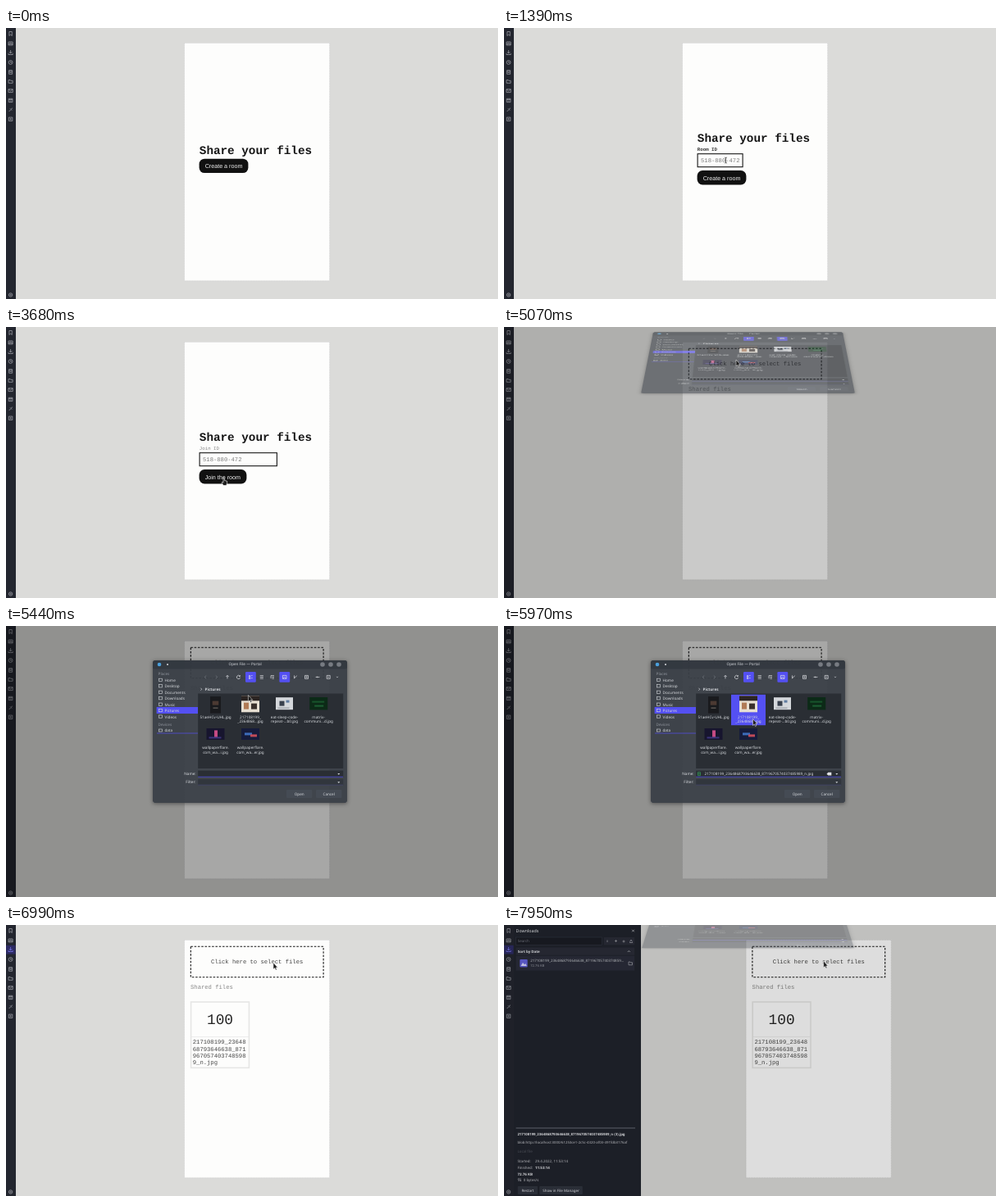
Recreate the animation shown at these times as an HTML page. Size 600 by 331 pixels, loop 8000 ms.

```html
<!DOCTYPE html>
<html lang="en">
<head>
<meta charset="utf-8">
<title>Share your files</title>
<style>
  html, body { margin: 0; width: 100%; height: 100%; overflow: hidden; background: #dbdbd9; }
  #stage { position: relative; width: 600px; height: 331px; overflow: hidden; }
  #stage > * { position: absolute; left: 0; top: 0; width: 600px; height: 331px; }
  #dim { background: #000; }
  #scene { perspective: 1286px; perspective-origin: 297.5px 165px; overflow: hidden; }
  #dialog { position: absolute; left: 179px; top: 42px; width: 237px; height: 174px;
    transform-origin: 50% 0; border-radius: 2px; box-shadow: 0 1px 5px rgba(0,0,0,.45); }
  text { white-space: pre; text-rendering: geometricPrecision; }
  .mono { font-family: "Liberation Mono", "Courier New", monospace; }
  .sans { font-family: "Liberation Sans", Arial, sans-serif; }
  .ui { font-family: "Noto Sans", sans-serif; }
  .line { fill: none; stroke-width: .7; }
</style>
</head>
<body>
<div id="stage">
  <svg id="base" viewBox="0 0 600 331"></svg>
  <div id="dim"></div>
  <div id="scene"><svg id="dialog" viewBox="179 42 237 174"></svg></div>
  <svg id="top" viewBox="0 0 600 331"></svg>
</div>
<script>
const LOOP = 8000;
const $ = id => document.getElementById(id);

const text = (cls, x, y, size, str, fill, extra = '') =>
  `<text class="${cls}" x="${x}" y="${y}" font-size="${size}" fill="${fill}" ${extra}>${str}</text>`;
const rect = (x, y, w, h, fill, extra = '') =>
  `<rect x="${x}" y="${y}" width="${w}" height="${h}" fill="${fill}" ${extra}/>`;
const dot = (x, y, r, fill) => `<circle cx="${x}" cy="${y}" r="${r}" fill="${fill}"/>`;
const line = (d, color, extra = '') => `<path class="line" d="${d}" stroke="${color}" ${extra}/>`;
const at = (x, y, body) => `<g transform="translate(${x} ${y})">${body}</g>`;
const group = (id, body) => `<g id="${id}">${body}</g>`;
const MID = 'text-anchor="middle"';
const BOLD = 'font-weight="700"';
const INK = '#161616', GREY = '#858585';
const ID = '217108199_2364868793646638_8719670574037485989';

// Web page
const heading = y => text('mono', 235.8, y, 14.3, 'Share your files', INK, BOLD);
const button = (y, w, label) => rect(235.6, y, w, 17.4, '#111', 'rx="6.5"') +
  text('sans', 242.7, y + 11.5, 7.15, label, '#f4f4f4');
const field = w => rect(236.1, 153.7, w, 16, '#fdfdfc', `stroke="${INK}" stroke-width="1.1"`) +
  text('mono', 240, 164.2, 7.2, '518-880-472', '#7b7b7b');
const nameLines = ['217108199_23648', '68793646638_871', '967057403748598', '9_n.jpg'];

const home = heading(153.6) + button(159.7, 59.8, 'Create a room');
const room = heading(139.2) + text('mono', 235.8, 150.2, 5.75, 'Room ID', '#333', BOLD) +
  field(55) + button(174, 59.8, 'Create a room');
const join = heading(139.2) + text('mono', 235.8, 150.2, 5.75, 'Join ID', GREY) +
  field(94.3) + button(174, 57.8, 'Join the room');
const card = rect(225.6, 94, 70.8, 80.4, '#fdfdfc', 'stroke="#e6e6e5" stroke-width="1.6"') +
  line('M226 136.6H296', '#e6e6e5') +
  '<text id="percent" class="mono" x="261" y="120.8" font-size="17.8" fill="#222" text-anchor="middle"></text>' +
  nameLines.map((s, i) => text('mono', 227.8, 145.2 + i * 8.33, 7.2, s, '#444')).join('');
const share = rect(225.3, 26.3, 161.8, 37.4, 'none',
    `stroke="${INK}" stroke-width="1.1" stroke-dasharray="2.6 1.7"`) +
  text('mono', 306.2, 47, 7.2, 'Click here to select files', '#444', MID) +
  text('mono', 225, 77.6, 7.2, 'Shared files', GREY) + group('card', card);

// Browser side bar
const glyphs = [
  [7, 'M-1.7-2.5H1.7V2.5L0 1L-1.7 2.5Z'],
  [19, 'M-2.5-2H2.5V2H-2.5ZM-2.5 .5H2.5M-1-1H1'],
  [30, 'M0-3V1M-1.8-.8L0 1L1.8-.8M-2.6 1V2.5H2.6V1'],
  [42, 'M-2.4 0A2.4 2.4 0 1 1 2.4 0A2.4 2.4 0 1 1-2.4 0M0-1.4V.2H1.3'],
  [54, 'M-2-2.3H2V2.3H-2ZM-2-1H2M-1 .5H1'],
  [65.3, 'M-2.5-1.8H-.4L0-1H2.5V2H-2.5Z'],
  [76.7, 'M-2.6-1.9H2.6V1.9H-2.6ZM-2.6-1.9L0 .3L2.6-1.9'],
  [88.3, 'M-2.3-2H2.3V2.3H-2.3ZM-2.3-.8H2.3M-1 .8H1'],
  [100, 'M-2 2L0 0M-.6-1.6L1.6 .6M.4-.6L2.3-2.2'],
  [111.3, 'M-2.2-2.2H2.2V2.2H-2.2ZM-1.1 0H1.1M0-1.1V1.1'],
  [326, 'M-2.2 0A2.2 2.2 0 1 1 2.2 0A2.2 2.2 0 1 1-2.2 0M-.7 0A.7 .7 0 1 1 .7 0A.7 .7 0 1 1-.7 0'],
];
const sidebar = rect(0, 0, 12, 331, '#23262f') +
  glyphs.map(([y, d]) => at(5.6, y, line(d, '#a9abb2'))).join('') +
  group('active', rect(0, 24.8, 11.6, 10.8, '#2d2b63') + at(5.6, 30, line(glyphs[2][1], '#8280ff')));

// Downloads panel
const pale = '#c9cbd0', white = '#eceef2', faint = '#565a64';
const ui = (x, y, str, fill = pale, size = 4.45, extra = '') => text('ui', x, y, size, str, fill, extra);
const panel = rect(12, 0, 155, 331, '#20232c') +
  ui(14.6, 8.8, 'Downloads', white, 5.3) + line('M156.2 5.7L158.8 8.3M158.8 5.7L156.2 8.3', pale) +
  rect(14.6, 15, 105, 9.4, '#1a1c24', 'stroke="#343845" stroke-width=".6"') + ui(16.8, 21.2, 'Search', '#777b85') +
  rect(121.8, 15, 37.4, 9.4, '#2a2d38') +
  line('M126 18.5V21M135 19L136.5 20.5L138 19M136.5 18V20.5M144.5 20H147.5M146 18.5V21.5M153 21.5H157M153.5 20.5L155 18L156.5 20.5', '#a9abb2') +
  rect(14.6, 27.5, 144.6, 9.2, '#2a2d38') + ui(16.8, 33.7, 'Sort by Date', white, 4.4, BOLD) +
  line('M150.8 33L152.3 31.5L153.8 33', pale) +
  rect(14.6, 37.6, 144.6, 18, '#2a2d3a') +
  rect(19.3, 42, 9.4, 9.4, '#6462dc', 'rx="1"') + '<path d="M20.5 50L23 46L25 48.5L26.2 47L27.8 50Z" fill="#dcdcff"/>' +
  ui(32.2, 45.4, ID.slice(0, 44) + '...') + ui(32.2, 51.2, '72.76 KB', '#999ca5', 4.2) +
  line('M152 45H153.7L154.2 45.8H156.5V48.8H152Z', '#a9abb2') +
  line('M14.6 248H160', '#8b8e98') +
  ui(16.4, 256.7, ID + '_n (3).jpg', white, 4.32, BOLD) +
  ui(16.4, 266.8, 'blob:http://localhost:3000/61253ce1-2c5c-4320-af03-491fdb3176af', pale, 4.3) +
  ui(16.4, 277.7, 'Local file', faint) +
  ui(16.4, 289.5, 'Started:') + ui(38, 289.5, '29.4.2022, 11:53:14') +
  ui(16.4, 297.5, 'Finished:') + ui(38, 297.5, '11:53:14', white, 4.45, BOLD) +
  ui(16.4, 305.8, '72.76 KB', white, 4.45, BOLD) +
  line('M18 313V309.5L17 310.5M20 309.5V313L21 312', pale) + ui(23.7, 313, '0 bytes/s') +
  rect(16.7, 319, 24.4, 10, '#30343f', 'rx="1"') + ui(28.9, 325.7, 'Restart', white, 4.45, MID) +
  rect(43.2, 319, 52.6, 10, '#30343f', 'rx="1"') + ui(69.5, 325.7, 'Show in File Manager', white, 4.45, MID);

$('base').innerHTML = rect(0, 0, 600, 331, '#dbdbd9') +
  group('page', rect(217.5, 18.3, 177.2, 290.5, '#fdfdfc', 'stroke="#cbcbc9" stroke-width=".8" stroke-dasharray="1 1"') +
    group('home', home) + group('room', room) + group('join', join) + group('share', share)) +
  group('panel', panel) + sidebar;

// File dialog
const VIOLET = '#5450f2', LABEL = '#d6d9dd';
const label = (x, y, str, fill = LABEL, extra = '') => text('ui', x, y, 4.65, str, fill, extra);
const places = ['Home', 'Desktop', 'Documents', 'Downloads', 'Music', 'Pictures', 'Videos'];
const tools = [
  [243, 'M1.2-1.8L-.8 0L1.2 1.8', 1], [257, 'M-1.2-1.8L.8 0L-1.2 1.8', 1],
  [270, 'M0 2V-2M-1.6-.4L0-2L1.6-.4'], [283.4, 'M1.7-1.2A2.1 2.1 0 1 0 2.1 .6M2-2.3V-.9H.6'],
  [298.4, 'M-2-1.8H-.5V-.3H-2ZM.7-1.8H2.2M.7 1.2H2.2M-2 .6H-.5V2H-2Z'],
  [311.7, 'M-2-1.8H2.2M-2 0H2.2M-2 1.8H2.2'], [325, 'M-2-1.8H2M-.6 0H2M-.6 1.8H2M-2-1.8V1.8'],
  [339.7, 'M-2.3-2H2.3V2H-2.3ZM-1.8 1.6L0-.4L1.8 1.6'], [353, 'M-1.5-2V1.5M-1.5 1.8L1.5-1.8'],
  [366.5, 'M-2-2H2V2H-2ZM-1 0H1M0-1V1'], [380, 'M-2.4 0H2.4M-.6-.8V.8'],
  [393.2, 'M-2-2H2V2H-2ZM-.9 0H.9'], [404, 'M-.8-.6L0 .4L.8-.6'],
];
const thumbs = [
  [255.5, 111.6, '51aeHCv-UHL.jpg', '', rect(-6.5, -25.5, 13, 20.5, '#191a1d') + rect(-3.8, -20, 7.6, 5, '#4c3a32') + rect(-3, -12, 6, 1, '#77706a')],
  [298, 111.6, '217108199_', '_2364868...jpg', rect(-11, -26.3, 22, 20, '#e7dfd2') + rect(-11, -26.3, 22, 6, '#2b2422') + rect(-8, -18, 6, 8, '#b07a55') + rect(1, -17, 7, 7, '#3a302c')],
  [339.5, 111.6, 'eat-sleep-code-', 'repeat-...b0.jpg', rect(-10.5, -24.4, 21, 15, '#d5d8dc') + rect(-6, -20, 6, 6, '#38404d') + rect(2, -21, 4, 3, '#617da0') + rect(-8, -12, 14, 1, '#8e949c')],
  [381.2, 111.6, 'matrix-', 'communi...d.jpg', rect(-11, -24.6, 22, 15.4, '#0c2a17') + rect(-8, -20, 15, 2, '#17542b') + rect(-5, -15, 11, 2, '#1c5e32')],
  [255.5, 149.4, 'wallpaperflare.', 'com_wa...i.jpg', rect(-11, -24.4, 22, 14, '#17152e') + rect(-1.5, -22, 4, 9, '#c54b83') + rect(-8, -14, 15, 2, '#3b347a')],
  [298, 149.4, 'wallpaperflare.', 'com_wa...er.jpg', rect(-11, -24.4, 22, 14, '#161c3c') + rect(-7, -19, 9, 3, '#3d6cba') + rect(0, -17, 8, 3, '#c04a58')],
];
const caret = (x, y) => `<path d="M${x - 1.5} ${y - .8}h3l-1.5 1.8z" fill="${LABEL}"/>`;

$('dialog').innerHTML =
  rect(179, 42, 237, 174, '#3a3f47', 'rx="2" opacity=".94"') + rect(179, 42, 237, 10.6, '#30353c', 'rx="2" opacity=".7"') +
  dot(187, 47, 2.3, '#4a9fdc') + dot(197, 47, 1, LABEL) +
  text('ui', 291.7, 48.4, 4.6, 'Open File — Portal', LABEL, MID) +
  [386, 396, 406].map(x => dot(x, 47, 2.8, '#777b82')).join('') +
  rect(292, 56, 12.8, 12.8, VIOLET, 'rx="1.2"') + rect(333.4, 56, 12.8, 12.8, VIOLET, 'rx="1.2"') +
  tools.map(([x, d, off]) => at(x, 62.4, line(d, off ? '#747982' : '#e2e4e8'))).join('') +
  label(185.6, 60, 'Places', '#90959d') +
  rect(183.6, 99, 50.4, 8, VIOLET) +
  places.map((s, i) => rect(186.6, 64.2 + i * 7.45, 3.7, 3.3, 'none', `stroke="${LABEL}" stroke-width=".6"`) +
    label(193.6, 67.8 + i * 7.45, s)).join('') +
  label(185.6, 122, 'Devices', '#90959d') +
  rect(186.6, 126, 3.7, 3, 'none', `stroke="${LABEL}" stroke-width=".6"`) + label(193.4, 129.4, 'data') +
  line('M184 131H234', VIOLET) +
  line('M237.3 75.7L238.8 77.2L237.3 78.7', LABEL) + label(242.6, 78.8, 'Pictures', LABEL, BOLD) +
  rect(234.2, 82.5, 177, 91.5, '#2a2e34') +
  group('picked', rect(277, 83.8, 42, 37.4, VIOLET)) +
  thumbs.map(([x, y, a, b, art]) => at(x, y, art + label(0, 1, a, LABEL, MID) + label(0, 6.8, b, LABEL, MID))).join('') +
  label(231.6, 182.4, 'Name:', LABEL, 'text-anchor="end"') + label(231.6, 192.4, 'Filter:', LABEL, 'text-anchor="end"') +
  rect(234.2, 176.6, 177, 8, '#2a2e34') + rect(234.2, 187, 177, 7.6, '#31363d') +
  line('M234.2 184.3H411', VIOLET) + line('M234.2 194.2H411', '#4b4d74') + caret(405.8, 180.7) + caret(405.8, 191) +
  group('typed', line('M236.4 178.6H239.4V182.6H236.4ZM236.4 180.6H239.4', '#39a55d') +
    text('ui', 244.6, 182.3, 4.6, ID + '_n.jpg', LABEL) +
    '<path d="M393.5 180.7l1.8-1.9h4v3.8h-4z" fill="#dfe1e5"/>') +
  rect(342, 200, 31.4, 10, '#454b54', 'rx="1"') + label(357.7, 206.6, 'Open', LABEL, MID) +
  rect(378, 200, 31.4, 10, '#454b54', 'rx="1"') + label(393.7, 206.6, 'Cancel', LABEL, MID);

// Pointer shapes
$('top').innerHTML = group('cursor',
  group('arrow', '<path d="M0 0V8L1.8 6.4L3 9L4.3 8.4L3.1 5.9H5.3Z" fill="#1c1c1c" stroke="#fff" stroke-width=".5"/>') +
  group('hand', '<path d="M-1 0Q0-1 .6 .2V3L3.6 3.8V6.5L2.7 9H-1L-3 5.6L-2.3 4.8L-1 5.6Z" fill="#1c1c1c" stroke="#fff" stroke-width=".6"/>') +
  group('beam', line('M-1.3-3.4Q0-3.4 0-2.6Q0-3.4 1.3-3.4M0-2.6V2.8M-1.3 3.5Q0 3.5 0 2.8Q0 3.5 1.3 3.5', '#222')));

// Rows are [time, value, value, ...]; ease shapes each segment
const smooth = u => u * u * (3 - 2 * u);
function track(rows, t, ease = u => u) {
  if (t <= rows[0][0]) return rows[0].slice(1);
  const i = rows.findIndex(r => r[0] > t);
  if (i < 0) return rows[rows.length - 1].slice(1);
  const a = rows[i - 1], b = rows[i], u = ease((t - a[0]) / (b[0] - a[0]));
  return a.slice(1).map((v, k) => v + (b[k + 1] - v) * u);
}

const pointer = [
  [160, 606, 238], [960, 267, 164], [1280, 267, 164], [1390, 270.5, 161.5], [2060, 270.5, 161.5],
  [2240, 460, 55], [2560, 460, 55], [2780, 554, -14], [2960, 554, -14], [3360, 268, 180],
  [3410, 268, 180], [3680, 266, 184.5], [3800, 266, 184.5], [4110, 434, 62], [4430, 434, 62],
  [4800, 283, 40], [5230, 283, 40], [5600, 303.5, 113.5], [6400, 303.5, 113.5],
  [6900, 326, 46], [7200, 326, 46], [7680, 389.7, 44],
];
const opening = [[4890, 0], [5190, 1], [6030, 1], [6240, 0], [7840, 0], [8140, 1]];
// progress, tilt, lift, depth
const glide = [[0, 72, -100, -70], [.37, 67, -70, -51], [.6, 60.7, -40, -33], [1, 0, 0, 0]];

const show = (id, on) => { $(id).style.display = on ? '' : 'none'; };

function draw(t) {
  const within = (a, b) => t >= a && t < b;
  show('home', t < 1280);
  show('room', within(1280, 2880));
  show('join', within(2880, 3760));
  show('share', t >= 3760);
  show('card', t >= 6400);
  $('percent').textContent = Math.round(track([[6400, 0], [6700, 100]], t)[0]);
  show('active', t >= 6880);
  show('panel', t >= 7040);
  $('page').setAttribute('transform', `translate(${t >= 7040 ? 77.6 : 0} 0)`);

  const [p] = track(opening, t);
  $('dim').style.opacity = .34 * p;
  const dialog = $('dialog');
  const [tilt, lift, depth] = track(glide, p);
  dialog.style.display = p > 0 ? 'block' : 'none';
  dialog.style.opacity = p;
  dialog.style.transform = p === 1 ? 'none' : `translate3d(0,${lift}px,${depth}px) rotateX(${tilt}deg)`;
  show('picked', within(5650, 7000));
  show('typed', within(5650, 7000));

  const [x, y] = track(pointer, t, smooth);
  $('cursor').setAttribute('transform', `translate(${x} ${y})`);
  const beam = within(1280, 2080);
  const hand = within(900, 1280) || within(3300, 3760);
  show('beam', beam);
  show('hand', hand);
  show('arrow', !beam && !hand);
}

const start = performance.now();
function tick() {
  draw((performance.now() - start) % LOOP);
  requestAnimationFrame(tick);
}
tick();
</script>
</body>
</html>
```
